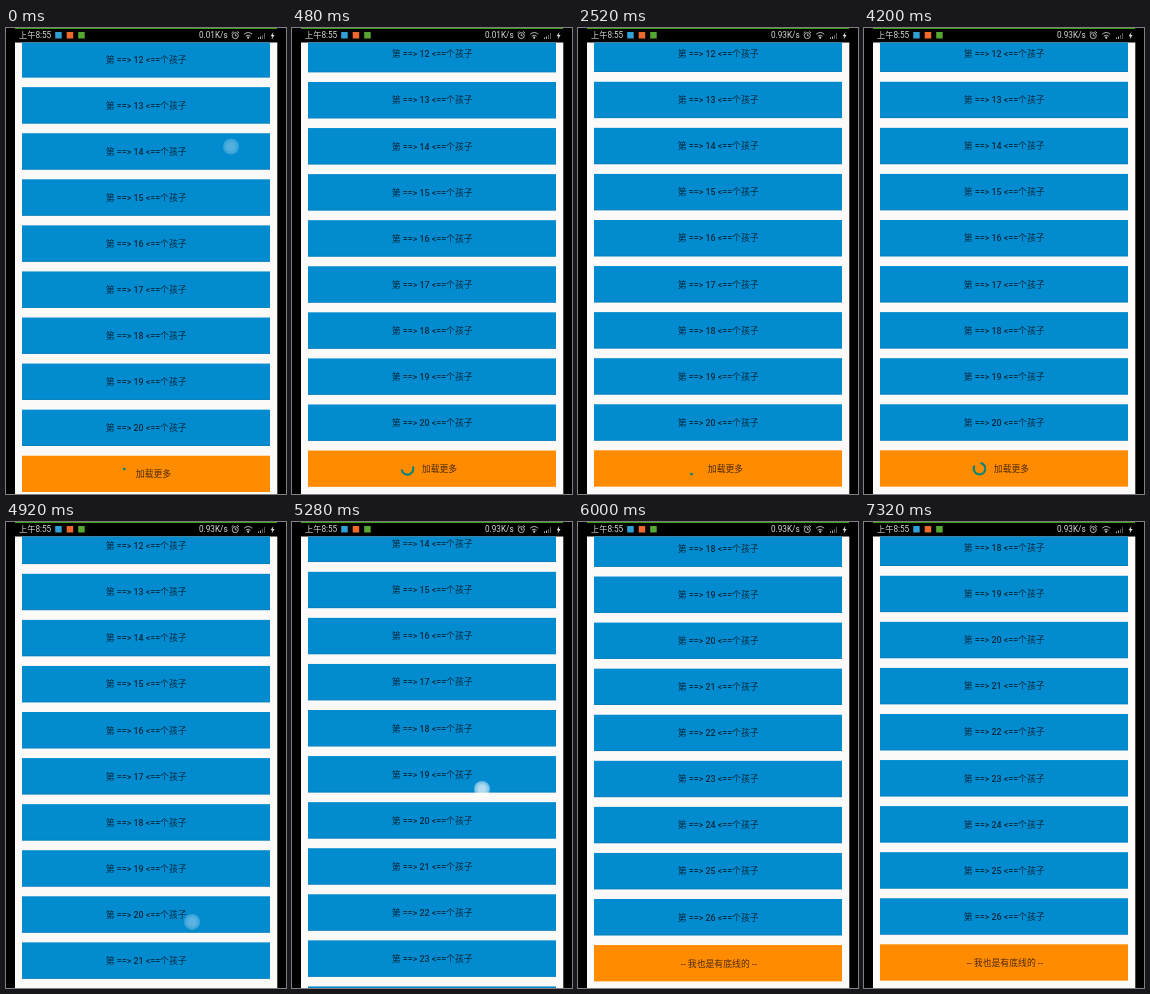
An HTML page that plays this animation: 280x466 px, repeating every 7440 ms.

```html
<!DOCTYPE html>
<html lang="zh-CN">
<head>
<meta charset="utf-8">
<title>加载更多</title>
<style>
  html, body { margin: 0; width: 100%; height: 100%; overflow: hidden; background: #000; }
  svg { display: block; width: 280px; height: 466px; }
  text { font-family: Roboto, "Noto Sans CJK SC", "Noto Sans CJK", sans-serif; }
  .label { font-size: 8.85px; text-anchor: middle; fill: #000; fill-opacity: .7; }
  .row .label { font-weight: 500; }
  .status { font-size: 8.2px; fill: #d8d8d8; }
  .icon { fill: none; stroke: #c8c8c8; stroke-width: .9; }
</style>
</head>
<body>
<svg viewBox="0 0 280 466">
  <defs>
    <clipPath id="screen"><rect x="9" y="14.4" width="262.3" height="452"/></clipPath>
  </defs>
  <rect width="280" height="466"/>
  <g clip-path="url(#screen)">
    <rect x="9" y="14" width="263" height="452" fill="#fcfaf8"/>
    <g id="list">
      <g id="footer">
        <rect x="16" y="-18.3" width="248" height="36.3" fill="#ff8b00"/>
        <g id="loading">
          <path id="arc" fill="none" stroke="#00857a" stroke-width="2.1" stroke-linecap="square"/>
          <text class="label" x="147.5" y="3.2">加载更多</text>
        </g>
        <text id="ending" class="label" x="140.8" y="3.2">-- 我也是有底线的 --</text>
      </g>
    </g>
    <ellipse id="glow" cx="172" rx="393"/>
    <g id="touch" fill="#fff">
      <circle r="8" fill-opacity=".42"/>
      <circle r="6.6" fill-opacity=".25"/>
      <circle r="4.4" fill-opacity=".3"/>
    </g>
  </g>

  <rect x="9" width="262" height="1" fill="#3f9c14"/>
  <text class="status" x="13" y="10.3">上午8:55</text>
  <rect x="49.2" y="4" width="6.5" height="6.5" fill="#2f9fd6"/>
  <rect x="60.7" y="4" width="6.5" height="6.5" fill="#ee6a2c"/>
  <rect x="72.2" y="4" width="6.5" height="6.5" fill="#56a632"/>
  <text class="status" id="speed" x="193" y="10.3"></text>
  <g class="icon">
    <circle cx="229.3" cy="7.6" r="3"/>
    <path d="M229.3 5.8V7.8H230.8M225.6 5 227.4 3.4M233 5 231.2 3.4"/>
    <path d="M238.2 6.2Q242.2 2.8 246.2 6.2M239.8 8.2Q242.2 6.2 244.6 8.2"/>
    <path d="M252.5 11V9.5M254.5 11V8.5"/>
    <path d="M256.5 11V7M258.5 11V5" stroke="#666"/>
  </g>
  <circle cx="242.2" cy="9.7" r="1.1" fill="#c8c8c8"/>
  <path d="M267.4 4 264.6 8.2H266.4L265.6 11.4 268.6 6.9H266.8Z" fill="#e0e0e0"/>
</svg>
<script>
const LOOP = 7440, STEP = 120, PITCH = 46.07, LOADED = 4320;
const SPIN = 2900, SPIN_PHASE = .045, SPIN_BASE = 12;
const SWIPE = 5032, SWIPE_END = 5640, SPEED = .387, LIMIT = 6 * PITCH;
const $ = id => document.getElementById(id);
const clamp = v => Math.min(1, Math.max(0, v));
const rowY = n => 26 + (n - 12) * PITCH;
const moveTo = (id, x, y) => $(id).setAttribute('transform', `translate(${x} ${y})`);

for (let n = 12; n <= 26; n++) {
  $('footer').insertAdjacentHTML('beforebegin', `
    <g class="row" id="row${n}" transform="translate(0 ${rowY(n)})">
      <rect x="16" y="-18.3" width="248" height="36.3" fill="#028bcf"/>
      <rect x="16" y="17.3" width="248" height=".7" fill="#0a7ab5"/>
      <text class="label" x="140.2" y="3.2">第 ==&gt; ${n} &lt;==个孩子</text>
    </g>`);
}

// The list settles, follows the swipe with a soft start, then glides to its end.
function scrollAt(t) {
  const drag = time => SPEED * 50 * Math.log1p(Math.exp((time - SWIPE) / 50));
  const settle = 5.4 * Math.exp(-t / 150);
  if (t <= SWIPE_END) return settle - drag(t);
  const rest = LIMIT - drag(SWIPE_END);
  return rest * Math.exp((SWIPE_END - t) / 90) - LIMIT;
}

// Each finger moves at a constant speed (px/ms) and fades in and out.
const fingers = [
  { down: -600, up: -130, x: 225, y: 118.5, vx: 0, vy: 0 },
  { down: 700, up: 1200, x: 192, y: 345, vx: .0316, vy: -.3815 },
  { down: 4980, up: 5700, x: 186.7, y: 377.8, vx: .0111, vy: -.3694 }
];

function drawTouch(t) {
  const strength = f => clamp((t - f.down + 120) / 120) * clamp(1 - (t - f.up) / 240);
  const finger = fingers.find(f => strength(f) > 0);
  $('touch').style.opacity = finger ? strength(finger) : 0;
  if (!finger) return;
  const { x, y, vx, vy, down } = finger;
  moveTo('touch', x + vx * (t - down), y + vy * (t - down));
}

// Cubic Bezier easing between x0 and x1 with y control values 0 and 1.
function ease(x, x0, c1, c2, x1) {
  if (x <= x0) return 0;
  if (x >= x1) return 1;
  let lo = 0, hi = 1;
  for (let i = 0; i < 24; i++) {
    const s = (lo + hi) / 2, r = 1 - s;
    const v = r * r * r * x0 + 3 * r * r * s * c1 + 3 * r * s * s * c2 + s * s * s * x1;
    if (v < x) lo = s; else hi = s;
  }
  return lo * lo * (3 - 2 * lo);
}

function arcPath(t) {
  const cycles = t / SPIN + SPIN_PHASE, phase = cycles % 1;
  const turn = SPIN_BASE + 216 * cycles + 90 * phase;
  const from = turn + 270 * ease(phase, .5, .7, .6, 1);
  const to = turn + 270 * ease(phase, 0, .2, .1, .5) + 1;
  const point = deg => {
    const a = deg * Math.PI / 180;
    return `${115.5 + 5.8 * Math.sin(a)} ${-5.8 * Math.cos(a)}`;
  };
  return `M${point(from)}A5.8 5.8 0 ${to - from > 180 ? 1 : 0} 1 ${point(to)}`;
}

function drawGlow(t) {
  const pull = clamp((t - 720) / 360), recede = clamp((t - 1200) / 1280);
  const strength = pull * (1 - recede) ** 2;
  const ry = 393 * .83 * strength;
  $('glow').setAttribute('ry', ry);
  $('glow').setAttribute('cy', 466 - 43.7 * strength + ry);
  $('glow').setAttribute('fill-opacity', .3 * strength);
}

function draw(t) {
  const loaded = t >= LOADED;
  moveTo('list', 0, scrollAt(t));
  moveTo('footer', 0, rowY(loaded ? 27 : 21));
  for (let n = 21; n <= 26; n++) $('row' + n).style.display = loaded ? '' : 'none';
  $('loading').style.display = loaded ? 'none' : '';
  $('ending').style.display = loaded ? '' : 'none';
  $('arc').setAttribute('d', arcPath(t));
  $('speed').textContent = t < 600 ? '0.01K/s' : '0.93K/s';
  drawGlow(t);
  drawTouch(t);
}

let start;
function tick(now) {
  start ??= now - 20;
  draw(Math.floor(((now - start) % LOOP) / STEP) * STEP);
  requestAnimationFrame(tick);
}
draw(0);
requestAnimationFrame(tick);
</script>
</body>
</html>
```
